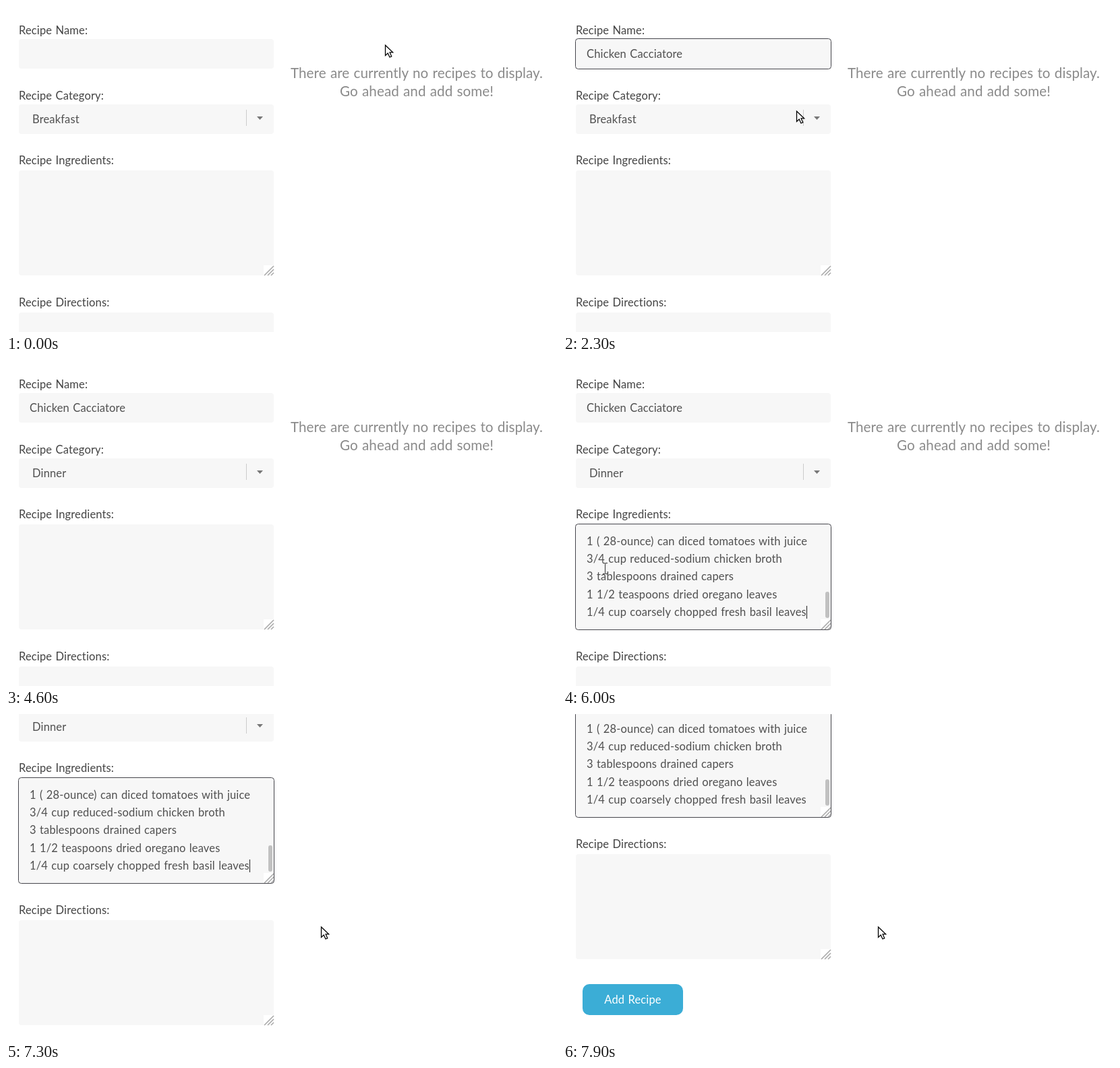
These frames come from a looping animation (817 px wide and 484 px high, 8000 ms). An HTML page:

```html
<!DOCTYPE html>
<html lang="en">
<head>
<meta charset="utf-8">
<title>Recipe form</title>
<style>
html, body { margin: 0; width: 100%; height: 100%; overflow: hidden; background: #fff; }
svg { display: block; }
text { font: 16.5px Lato, "Open Sans", sans-serif; letter-spacing: .15px; word-spacing: .9px; fill: #505050; white-space: pre; }
.label { fill: #444; }
.note { font-size: 20.6px; letter-spacing: .08px; fill: #8a8a8a; text-anchor: middle; }
.box { fill: #f7f7f7; }
.ring { fill: none; stroke: #46464c; }
.caret { fill: #222; }
</style>
</head>
<body>
<svg id="stage" width="817" height="484" viewBox="0 0 817 484">
  <defs>
    <linearGradient id="shade" x2="0" y2="1">
      <stop stop-color="#fafafa"/><stop offset="1" stop-color="#ececec"/>
    </linearGradient>
    <filter id="wide" x="-30%" y="-150%" width="160%" height="400%"><feGaussianBlur stdDeviation="17"/></filter>
    <filter id="tight" x="-30%" y="-150%" width="160%" height="400%"><feGaussianBlur stdDeviation="6"/></filter>
    <g id="grip">
      <path d="M0 0h15v15h-15z" fill="#fff"/>
      <path d="M1 15L15 1M6 15L15 6M11 15L15 11" stroke="#aaa" stroke-width="1.6"/>
    </g>
  </defs>
  <g id="page">
    <text class="note" x="609" y="107">There are currently no recipes to display.</text>
    <text class="note" x="609" y="134">Go ahead and add some!</text>

    <text class="label" x="19" y="42">Recipe Name:</text>
    <rect class="box" x="19" y="49" width="378" height="44" rx="4"/>
    <rect class="ring" id="nameRing" x="18.5" y="48.5" width="379" height="45" rx="4"/>
    <text id="name" x="35" y="77">Chicken Cacciatore</text>
    <rect class="caret" id="nameCaret" y="62" width="1" height="19"/>

    <text class="label" x="19" y="139">Recipe Category:</text>

    <text class="label" x="19" y="235">Recipe Ingredients:</text>
    <rect class="box" x="19" y="244" width="378" height="156" rx="4"/>
    <g id="items"></g>
    <use href="#grip" x="382" y="385"/>
    <rect class="ring" id="itemsRing" x="18.5" y="243.5" width="379" height="157" rx="4"/>
    <rect class="caret" id="itemsCaret" width="1" height="19"/>

    <g id="shadow">
      <rect x="19" y="210" width="378" height="58" opacity=".3" filter="url(#wide)"/>
      <rect x="19" y="206" width="378" height="58" opacity=".22" filter="url(#tight)"/>
    </g>
    <rect class="box" id="select" x="19" y="146" width="378" height="44" rx="4"/>
    <rect class="ring" id="selectRing" x="18.5" y="145.5" width="379" height="45" rx="4"/>
    <text id="choice" x="39" y="174"></text>
    <path d="M356.5 154v24" stroke="#ccc"/>
    <path d="M372 164h9l-4.5 5z" fill="#777"/>
    <g id="list">
      <rect x="19" y="190" width="378" height="59" fill="#000"/>
      <path d="M19 190h378l-2 1h-374v57l-2 1z" fill="#888"/>
      <rect x="21" y="191" width="374" height="57" fill="#f7f7f7"/>
      <rect id="hover" x="21" width="374" height="19" fill="#f3845a"/>
    </g>

    <text class="label" x="19" y="446">Recipe Directions:</text>
    <rect class="box" x="19" y="455" width="378" height="156" rx="4"/>
    <use href="#grip" x="382" y="596"/>
    <rect x="29" y="648" width="149" height="46" rx="10" fill="#3badd6"/>
    <text x="103.5" y="677" text-anchor="middle" style="fill:#fff">Add Recipe</text>
  </g>
  <path id="arrow" d="M.5 1.2V16.4L4.2 13 6.9 19 9.7 17.8 7.1 11.9H11.6Z" fill="#fff" stroke="#000" stroke-width="1.3"/>
  <path id="beam" d="M1 .5h3l.5 1 .5-1h3M4.5 1v15M1 16.5h3l.5-1 .5 1h3" fill="none" stroke="#333"/>
</svg>
<script>
const LOOP = 8000, STEP = 100;
const $ = id => document.getElementById(id);
const show = (id, on) => $(id).setAttribute('visibility', on ? 'visible' : 'hidden');
const set = (id, attrs) => { for (const k in attrs) $(id).setAttribute(k, attrs[k]); };
const within = (t, a, b) => t >= a && t < b;

function add(parent, tag, attrs, label = '') {
  const el = document.createElementNS('http://www.w3.org/2000/svg', tag);
  for (const k in attrs) el.setAttribute(k, attrs[k]);
  el.textContent = label;
  $(parent).append(el);
  return el;
}

const meals = ['Breakfast', 'Dinner', 'Lunch'];
const options = meals.map((m, i) => add('list', 'text', { x: 24, y: 206 + 19 * i }, m));

const items = [
  '1 ( 28-ounce) can diced tomatoes with juice',
  '3/4 cup reduced-sodium chicken broth',
  '3 tablespoons drained capers',
  '1 1/2 teaspoons dried oregano leaves',
  '1/4 cup coarsely chopped fresh basil leaves'
].map((line, i) => add('items', 'text', { x: 35, y: Math.round(275 + 26.2 * i) }, line));
add('items', 'rect', { x: 389, y: 344, width: 6, height: 39, rx: 3, fill: '#c1c1c1' });

// rows: time, x, y
const pointer = [
  [200, 562, 57], [800, 353, 72], [1800, 353, 72], [2300, 346, 155], [2700, 346, 155],
  [3300, 324, 208], [3500, 322, 214], [3900, 322, 214], [4600, 60, 219],
  [4900, 60, 300], [5000, 50, 300], [5100, 34, 300], [5900, 34, 300], [6600, 467, 315]
];
// rows: time, offset
const scroll = [
  [6800, 0], [6900, 4], [7000, 20], [7100, 56], [7200, 104], [7300, 149],
  [7500, 199], [7700, 228], [7800, 240], [7900, 247]
];

const smooth = u => u * u * (3 - 2 * u);

function sample(keys, t, ease = u => u) {
  if (t <= keys[0][0]) return keys[0].slice(1);
  for (let i = 1; i < keys.length; i++) {
    const a = keys[i - 1], b = keys[i];
    if (t <= b[0]) {
      const u = ease((t - a[0]) / (b[0] - a[0]));
      return a.slice(1).map((v, k) => Math.round(v + (b[k + 1] - v) * u));
    }
  }
  return keys[keys.length - 1].slice(1);
}

const endOf = el => Math.round(35 + el.getComputedTextLength());

function draw(t) {
  const typed = t >= 1500, open = within(t, 2500, 3800), pasted = t >= 6000;

  show('name', typed);
  show('nameRing', within(t, 1100, 2500));
  show('nameCaret', within(t, 1100, 2000));
  set('nameCaret', { x: typed ? endOf($('name')) : 35 });

  const hovered = t >= 3400 ? 1 : 0;
  show('list', open);
  show('shadow', open);
  show('selectRing', within(t, 2500, 4000));
  $('select').style.fill = open ? 'url(#shade)' : '';
  $('choice').textContent = meals[t < 3800 ? 0 : 1];
  $('choice').style.fill = open ? '#111' : '';
  set('hover', { y: 191 + 19 * hovered });
  options.forEach((o, i) => o.style.fill = i === hovered ? '#f3f0ea' : '#111');

  show('items', pasted);
  show('itemsRing', t >= 5500);
  show('itemsCaret', within(t, 5500, 7800));
  set('itemsCaret', pasted ? { x: endOf(items[4]), y: 365 } : { x: 35, y: 260 });

  const [top] = sample(scroll, t);
  set('page', { transform: `translate(0 ${-top})` });

  const [x, y] = sample(pointer, t, smooth);
  const inArea = t >= 4600 && x < 398;
  show('arrow', !inArea);
  show('beam', inArea && (within(t, 5000, 5500) || t >= 6000));
  for (const id of ['arrow', 'beam']) set(id, { transform: `translate(${x} ${y})` });
}

const start = performance.now();
function tick() {
  const t = (performance.now() - start) % LOOP;
  draw(Math.floor(t / STEP) * STEP);
  requestAnimationFrame(tick);
}
tick();
</script>
</body>
</html>
```
